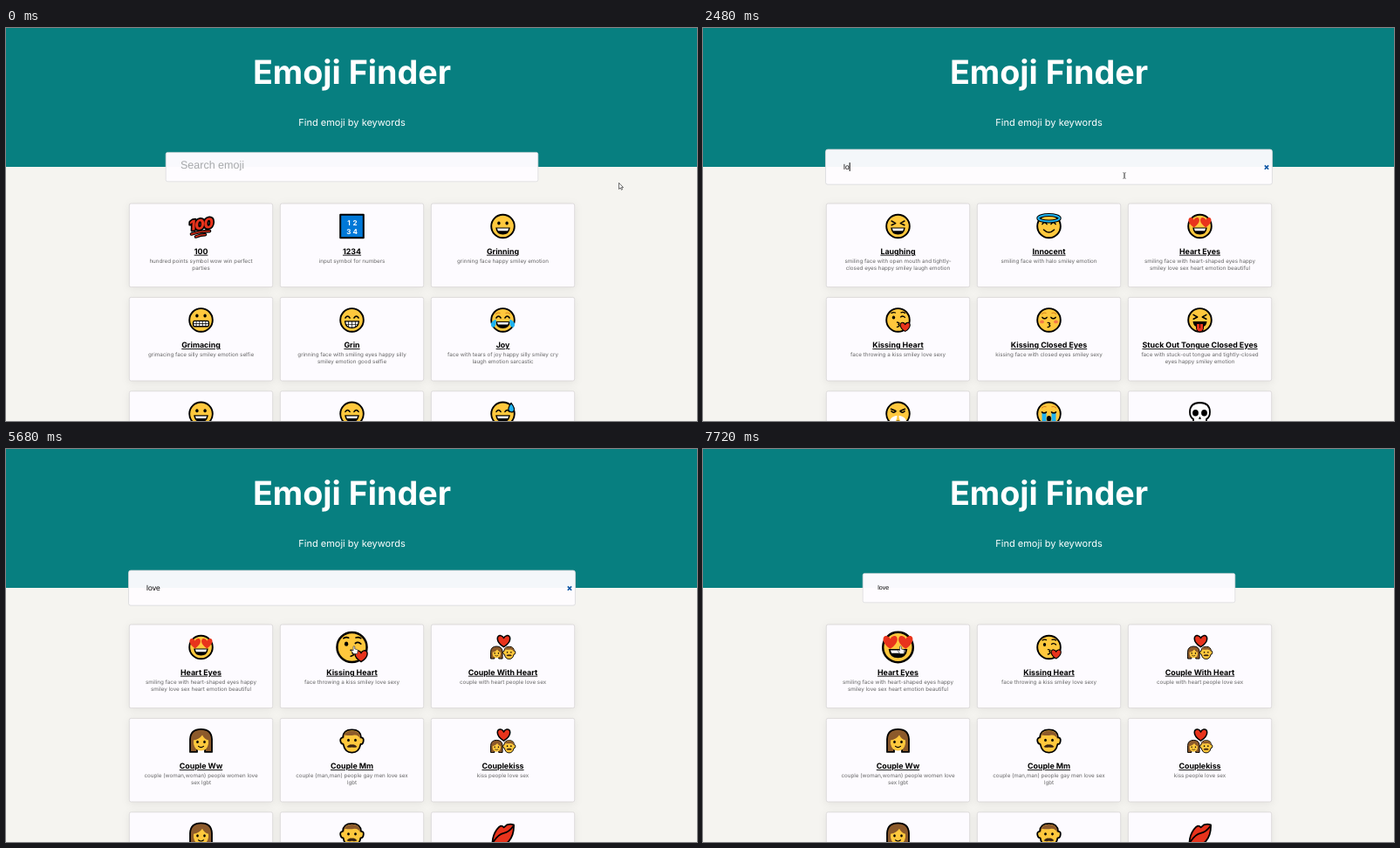
An HTML page for the animation above (7800 ms loop, 792 px wide and 450 px high).

```html
<!DOCTYPE html>
<html lang="en">
<head>
<meta charset="utf-8">
<title>Emoji Finder</title>
<style>
html, body { margin: 0; width: 100%; height: 100%; overflow: hidden; background: #f5f4f0; }
svg { display: block; width: 792px; height: 450px; font-family: Inter, sans-serif; text-rendering: geometricPrecision; }
text { text-anchor: middle; }
h1, .head { font-weight: 700; font-size: 37.7px; fill: #fff; font-optical-sizing: none; }
.sub { font-size: 11px; fill: #fff; }
.card { fill: #fdfbff; stroke: #d6d3d3; stroke-width: .8; filter: drop-shadow(0 2px 5px rgba(0,0,0,.07)); }
.name { font-weight: 700; font-size: 8.85px; text-decoration: underline; }
.desc { font-size: 6.25px; fill: #666; }
.field text { text-anchor: start; font-family: "Liberation Sans", Arial, sans-serif; }
</style>
</head>
<body>
<svg viewBox="0 0 792 450">
  <rect width="792" height="159" fill="#077f80"/>
  <text class="head" x="396.5" y="64.3">Emoji Finder</text>
  <text class="sub" x="396.5" y="111.6">Find emoji by keywords</text>
  <g id="lists"></g>
  <g id="field" class="field">
    <clipPath id="line"><rect x="190" y="145" width="400" height="18.2"/></clipPath>
    <rect id="box" x="183.2" y="142.4" width="426.6" height="33.4" rx="2" fill="#fefcff" stroke="#d9d9dc" stroke-width=".7"/>
    <text id="hint" x="200" y="161.1" font-size="12.5" fill="#a6a8aa" clip-path="url(#line)">Search emoji</text>
    <text id="typed" x="200.3" y="161.3" font-size="7.1"></text>
    <rect id="caret" y="154.9" width=".8" height="8.2"/>
    <path id="clear" d="M602.6 157.7l3.6 3.6m0-3.6l-3.6 3.6" stroke="#0b56a4" stroke-width="1.4"/>
  </g>
  <g id="arrow"><path d="M0 0V7.2L1.8 5.6 2.9 8 4 7.5 3 5.2H5Z" fill="#fff" stroke="#333" stroke-width=".7"/></g>
  <g id="beam"><path d="M-1.7-3.3Q0-3.4 0-2.4V2.4Q0 3.4-1.7 3.3M1.7-3.3Q0-3.4 0-2.4V2.4Q0 3.4 1.7 3.3" fill="none" stroke="#555" stroke-width=".8"/></g>
  <g id="hand"><path d="M-1-3.8Q0-4.8 .8-3.8V-1L3.6-.3Q4.4 0 4.2 1L3.6 4.5H-.6L-3.2 1Q-3-.2-1.8.3L-1 1Z" fill="#fff" stroke="#333" stroke-width=".7"/></g>
</svg>
<script>
const $ = id => document.getElementById(id);
const LOOP = 7800, CX = 396.5, CY = 159;
const RED = '#e8331c', BLUE = '#1fb3f0', HAIR = '#8c5a2b', SKIN = '#ffc83d';

// Drawing helpers; every emoji is centred on 0,0 and about 28 px wide
const shape = (d, fill = '#000') => `<path d="${d}" fill="${fill}"/>`;
const line = (d, w = 1.5, color = '#000') =>
  `<path d="${d}" fill="none" stroke="${color}" stroke-width="${w}" stroke-linecap="round" stroke-linejoin="round"/>`;
const edged = (d, fill, w = 1.8) =>
  `<path d="${d}" fill="${fill}" stroke="#000" stroke-width="${w}" stroke-linejoin="round"/>`;
const oval = (x, y, rx, ry = rx, fill = '#000') => `<ellipse cx="${x}" cy="${y}" rx="${rx}" ry="${ry}" fill="${fill}"/>`;
const at = (x, y, s, body) => `<g transform="translate(${x} ${y}) scale(${s})">${body}</g>`;
const heart = (x, y, s, w = 0) =>
  at(x, y, s, edged('M0 5C-8 0-6-6-2.5-5Q-.7-4.6 0-2.8Q.7-4.6 2.5-5C6-6 8 0 0 5Z', RED, w));

const face = `<circle r="13.3" fill="${SKIN}" stroke="#000" stroke-width="1.9"/>`;
const eyes = oval(-4.6, -3.6, 1.7, 2) + oval(4.6, -3.6, 1.7, 2);
const happyEyes = line('M-7.6-2.4Q-5-6.4-2.4-2.4M2.4-2.4Q5-6.4 7.6-2.4');
const shutEyes = line('M-7.6-3Q-5-.2-2.4-3M2.4-3Q5-.2 7.6-3');
const tightEyes = line('M-7.4-6L-2.8-3.4-7.4-1.2M7.4-6L2.8-3.4 7.4-1.2');
const brows = line('M-8-7Q-6-9-3.4-8M8-7Q6-9 3.4-8', 1.1, '#d98220');
const grin = shape('M-8.3 1.5H8.3Q7.5 9.5 0 9.5T-8.3 1.5Z') + shape('M-6.6 2.6H6.6L5.6 5.2H-5.6Z', '#fff');
const teeth = edged('M-8 1.5H8Q7.2 9 0 9T-8 1.5Z', '#fff', 1.3) + line('M-4 2V8M0 2V9M4 2V8M-7 5H7', .7);

const woman = edged('M-12.5 12.5V-2Q-12-13.5 0-13.5T12.5-2V12.5H4.5V9H-4.5V12.5Z', HAIR) +
  shape('M-8.5-1Q-2-2 1.5-7Q4-2 8.5-1V3Q7 11 0 11T-8.5 3Z', SKIN) +
  oval(-4, 1, 1.3, 1.6) + oval(4, 1, 1.3, 1.6) + line('M-3 6Q0 8.4 3 6', 1.2);
const man = edged('M-10.5-4Q-10-13 0-13T10.5-4Q13.8-4 13.2 0T10 3.5Q8 13.3 0 13.3T-10 3.5Q-12.6 3.5-13.2 0T-10.5-4Z', SKIN) +
  shape('M-9.8-2Q-10-12 0-12T9.8-2Q8-7 3-7Q-3-6-8-7Z', HAIR) +
  oval(-4, -1, 1.4, 1.6) + oval(4, -1, 1.4, 1.6) + shape('M-6 6.5Q-3 3 0 4Q3 3 6 6.5Q3 8 0 7Q-3 8-6 6.5Z', '#3a2413');
const pair = at(-7.2, 6.3, .54, woman) + at(7.2, 6.3, .54, man) + heart(1, -6.8, 1.3, 1.2);

const art = {
  hundred: `<g transform="rotate(-8) skewX(-10)"><text y="3.4" textLength="" font-size="16" font-weight="900" letter-spacing="-1" fill="${RED}" stroke="#000" stroke-width="3.4" paint-order="stroke" stroke-linejoin="round">100</text></g>`
    .replace(' textLength=""', '') +
    line('M-11 9Q0 5.5 10 5.6M-6 12Q0 9.6 5 9.6', 3.6) + line('M-11 9Q0 5.5 10 5.6M-6 12Q0 9.6 5 9.6', 1.4, RED),
  digits: edged('M-13.3-13.3H13.3V13.3H-13.3Z', '#0078d7', 2) +
    '<g fill="#fff" font-size="8" font-weight="700"><text x="-3.6" y="-1.2">1</text><text x="3.6" y="-1.2">2</text><text x="-3.6" y="8.6">3</text><text x="3.6" y="8.6">4</text></g>',
  grinning: face + eyes + grin,
  grimacing: face + oval(-4.6, -5, 1.7, 2) + oval(4.6, -5, 1.7, 2) +
    edged('M-7.5 1H7.5Q9 1 9 4.2T7.5 7.4H-7.5Q-9 7.4-9 4.2T-7.5 1Z', '#fff', 1.4) + line('M-5.4 1V7M-1.8 1V7M1.8 1V7M5.4 1V7M-8.5 4.2H8.5', .8),
  grin: face + happyEyes + teeth,
  joy: face + brows + happyEyes + grin +
    shape('M-8-1Q-14.5 2-13.5 6T-9 7Q-7 4-8-1ZM8-1Q14.5 2 13.5 6T9 7Q7 4 8-1Z', BLUE),
  smile: face + happyEyes + grin,
  sweat: face + happyEyes + grin + edged('M9.5-12.5Q14.5-6 12.5-3.2T7-3.4Q5-6 9.5-12.5Z', BLUE, 1.2),
  laughing: face + tightEyes + grin,
  innocent: face + happyEyes + line('M-6 4Q0 10 6 4') +
    '<ellipse cy="-9.2" rx="12.2" ry="3.7" fill="none" stroke="#000" stroke-width="4"/>' +
    `<ellipse cy="-9.2" rx="12.2" ry="3.7" fill="none" stroke="${BLUE}" stroke-width="2"/>`,
  heartEyes: face + grin + heart(-6.8, -4.2, 1.12) + heart(6.8, -4.2, 1.12),
  kissHeart: face + oval(-5, -3, 1.7, 2) + line('M3-3.5Q5.5-5.5 8-3M-7.5-8Q-5-9.5-3-8.4M3.5-8.6Q6-9.5 8-8', 1.3) +
    line('M-1 2.6Q3 3 .4 5Q3.4 6.6-1 8', 1.4) + heart(8.2, 8, 1, 1.1),
  kissClosed: face + brows + shutEyes + oval(-8, 2, 2.4, 1.9, '#f47a45') + oval(8, 2, 2.4, 1.9, '#f47a45') +
    line('M-1.4 3Q2.6 3.2 .2 5.2Q3 7-1.4 8.2', 1.3),
  tongue: face + tightEyes + shape('M-8 1.5H8Q7.5 8.5 0 8.5T-8 1.5Z') + edged('M-4 4H4V10Q3.4 13.5 0 13.5T-4 10Z', RED, 1) + line('M0 5V9', .8),
  triumph: face + line('M-8-5.5L-3-3.5M8-5.5L3-3.5') + shutEyes +
    shape('M-1 2Q-8 3-9.5 8T-3 9Q-1 6-1 2ZM1 2Q8 3 9.5 8T3 9Q1 6 1 2Z', '#fff') + line('M-4 10Q0 7 4 10'),
  sob: face + brows + shape('M-8-1H-3V11H-8ZM3-1H8V11H3Z', BLUE) + line('M-8-2Q-5.5 0-3-2M3-2Q5.5 0 8-2') + oval(0, 5.5, 2.6, 3.4),
  skull: edged('M0-12.8Q11.5-12.5 11.5-2Q11.5 4 7.5 6V12.8H-7.5V6Q-11.5 4-11.5-2Q-11.5-12.5 0-12.8Z', '#fff') +
    oval(-5, -1, 3.4, 3.8) + oval(5, -1, 3.4, 3.8) + shape('M0 3L1.6 6H-1.6Z') + line('M-2.5 9V12M2.5 9V12', 1.2),
  couple: pair,
  couplekiss: pair,
  woman, man,
  lips: edged('M-12 10Q-12 1-7-6T1-8.5Q3-10 4.5-11.5Q9-13 12.5-11.5Q13 0 7 7T-12 10Z', RED) + line('M-11 8Q-5-1 1-2T12-10', 1.8)
};

const heartEyes = ['heartEyes', 'Heart Eyes', 'smiling face with heart-shaped eyes happy', 'smiley love sex heart emotion beautiful'];
const kissHeart = ['kissHeart', 'Kissing Heart', 'face throwing a kiss smiley love sexy'];
const lists = [[
  ['hundred', '100', 'hundred points symbol wow win perfect', 'parties'],
  ['digits', '1234', 'input symbol for numbers'],
  ['grinning', 'Grinning', 'grinning face happy smiley emotion'],
  ['grimacing', 'Grimacing', 'grimacing face silly smiley emotion selfie'],
  ['grin', 'Grin', 'grinning face with smiling eyes happy silly', 'smiley emotion good selfie'],
  ['joy', 'Joy', 'face with tears of joy happy silly smiley cry', 'laugh emotion sarcastic'],
  ['grinning'], ['smile'], ['sweat']
], [
  ['laughing', 'Laughing', 'smiling face with open mouth and tightly-', 'closed eyes happy smiley laugh emotion'],
  ['innocent', 'Innocent', 'smiling face with halo smiley emotion'],
  heartEyes, kissHeart,
  ['kissClosed', 'Kissing Closed Eyes', 'kissing face with closed eyes smiley sexy'],
  ['tongue', 'Stuck Out Tongue Closed Eyes', 'face with stuck-out tongue and tightly-closed', 'eyes happy smiley emotion'],
  ['triumph'], ['sob'], ['skull']
], [
  heartEyes, kissHeart,
  ['couple', 'Couple With Heart', 'couple with heart people love sex'],
  ['woman', 'Couple Ww', 'couple (woman,woman) people women love', 'sex lgbt'],
  ['man', 'Couple Mm', 'couple (man,man) people gay men love sex', 'lgbt'],
  ['couplekiss', 'Couplekiss', 'kiss people love sex'],
  ['woman'], ['man'], ['lips']
]];

const card = ([icon, name = '', ...desc], i) =>
  `<g transform="translate(${223.5 + i % 3 * 173} ${227 + Math.floor(i / 3) * 107.4})">
    <rect class="card" x="-82.2" y="-26" width="164.4" height="95.6" rx="2"/>
    <g class="icon">${art[icon]}</g><text class="name" y="31.7">${name}</text>
    ${desc.map((s, n) => `<text class="desc" y="${41.8 + n * 7.7}">${s}</text>`).join('')}</g>`;
$('lists').innerHTML = lists.map(l => `<g>${l.map(card).join('')}</g>`).join('');
const pages = [...$('lists').children];
const icons = pages[2].querySelectorAll('.icon');

const clamp = p => Math.max(0, Math.min(1, p));
const smooth = p => (p = clamp(p), p * p * (3 - 2 * p));
// CSS "ease" curve
function ease(p) {
  let lo = 0, hi = 1, u = .5;
  for (let i = 0; i < 16; i++) {
    u = (lo + hi) / 2;
    if (.75 * u * (1 - u) + u ** 3 < clamp(p)) lo = u; else hi = u;
  }
  return .3 * u * (1 - u) ** 2 + 3 * u * u * (1 - u) + u ** 3;
}
const pulse = (t, on, off) => ease((t - on) / 300) - ease((t - off) / 300);
const show = (el, on) => el.style.display = on ? '' : 'none';

// Pointer moves: start, end, x, y
const moves = [[160, 510, 483, 169], [5160, 5600, 399, 230], [5860, 5950, 226.5, 230]];
function pointer(t) {
  let x = 702.5, y = 177.3;
  for (const [a, b, tx, ty] of moves) {
    const k = smooth((t - a) / (b - a));
    x += (tx - x) * k;
    y += (ty - y) * k;
  }
  return [x, y];
}

const FOCUS = 520, BLUR = 6410;
const keys = [2160, 2480, 2680, 3040];
function draw(t) {
  const page = t < 2480 ? 0 : t < 2760 ? 1 : 2;
  pages.forEach((p, i) => show(p, i === page));
  icons[0].setAttribute('transform', `scale(${1 + .3 * pulse(t, 5920, LOOP + 1)})`);
  icons[1].setAttribute('transform', `scale(${1 + .3 * pulse(t, 5470, 5893)})`);

  const focus = pulse(t, FOCUS, BLUR), s = 1 + .2 * focus;
  $('field').setAttribute('transform', `translate(${CX} ${CY}) scale(${s}) translate(${-CX} ${-CY})`);
  $('box').setAttribute('fill-opacity', .98 - .02 * focus);

  const n = keys.filter(k => t >= k).length, active = t >= FOCUS && t < BLUR;
  $('typed').textContent = 'love'.slice(0, n);
  show($('hint'), !n);
  show($('clear'), n && active);
  const since = t - Math.max(FOCUS, ...keys.filter(k => t >= k));
  show($('caret'), active && Math.floor(since / 525) % 2 === 0);
  $('caret').setAttribute('x', 200.3 + (n ? $('typed').getComputedTextLength() : 0));

  const [x, y] = pointer(t);
  const inField = Math.abs(x - CX) < 213.3 * s && Math.abs(y - CY) < 16.7 * s;
  const onIcon = page === 2 && [223.5, 396.5].some(c => Math.hypot(x - c, y - 227) < 14.5);
  const kind = inField ? 'beam' : onIcon ? 'hand' : 'arrow';
  for (const id of ['arrow', 'beam', 'hand']) {
    show($(id), id === kind);
    $(id).setAttribute('transform', `translate(${x} ${y})`);
  }
}

const start = performance.now();
function tick() {
  draw((performance.now() - start) % LOOP);
  requestAnimationFrame(tick);
}
tick();
</script>
</body>
</html>
```
